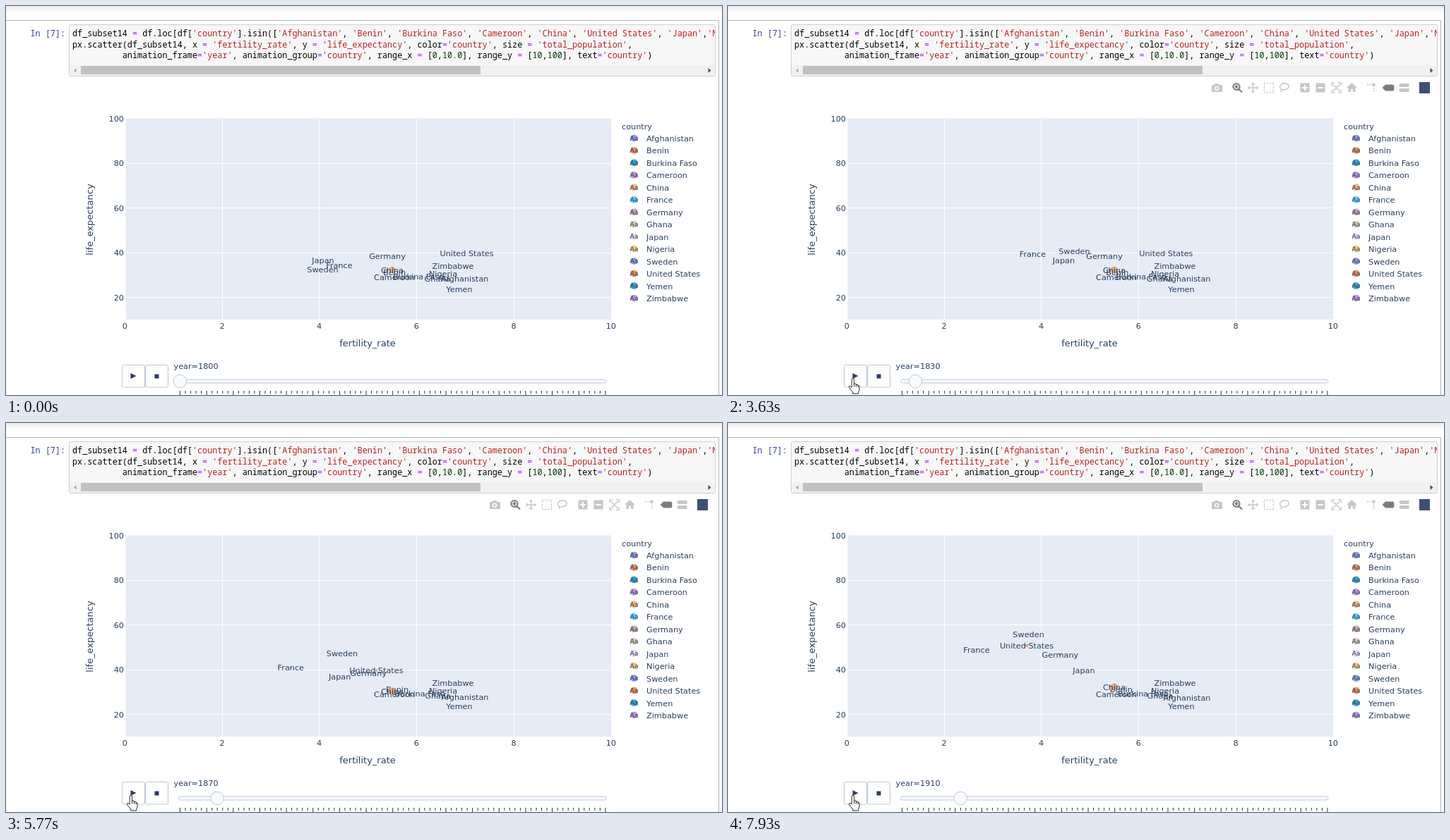
Animation, 1014 px wide and 552 px high, one loop 8000 ms. Source, as an HTML page:

```html
<!DOCTYPE html>
<html lang="en">
<head>
<meta charset="utf-8">
<title>Fertility and life expectancy</title>
<style>
  html, body { margin: 0; width: 100%; height: 100%; overflow: hidden; background: #fff; }
  svg { display: block; width: 1014px; height: 552px; }
  text { font: 11.25px "DejaVu Sans", Verdana, sans-serif; fill: #2a3f5f; white-space: pre; }
  .title { font-size: 13px; }
  .mono { font: 11.8px "Noto Sans Mono", "DejaVu Sans Mono", monospace; fill: #000; }
  .prompt { fill: #303f9f; }
  .str { fill: #ba2121; }
  .op { fill: #a2f; }
  .num { fill: #063806; }
  .key { font-size: 9.2px; }
  .control { fill: #fff; stroke: #bec8d9; }
  .rail { fill: #f8fafc; stroke: #bec8d9; }
  .icon { fill: none; stroke: #c7c7c7; stroke-width: 1.5; }
  .icon.solid { fill: #c7c7c7; stroke: none; }
  .icon.on { stroke: #7c7c7c; stroke-width: 2; }
  .icon.solid.on { fill: #7c7c7c; }
</style>
</head>
<body>
<svg id="stage" viewBox="0 0 1014 552">
  <defs>
    <linearGradient id="shade" x2="0" y2="1">
      <stop stop-color="#ebebeb"/><stop offset="1" stop-color="#fff"/>
    </linearGradient>
    <clipPath id="codeBox"><rect x="90" y="28" width="914" height="56"/></clipPath>
  </defs>
  <rect width="1014" height="10" fill="url(#shade)"/>
  <path d="M0 20.5H1009.5V552" fill="none" stroke="#b4b4b4"/>
  <text class="mono prompt" x="34.5" y="43">In [7]:</text>
  <rect x="89.5" y="26.5" width="915" height="73" rx="2" fill="#f7f7f7" stroke="#cfcfcf"/>
  <g id="code" clip-path="url(#codeBox)"></g>
  <rect x="90" y="84" width="914" height="15" fill="#f1f1f1"/>
  <rect x="106" y="85" width="566" height="12" fill="#c1c1c1"/>
  <path d="M99.5 88.5V94.5L96 91.5z" fill="#a3a3a3"/>
  <path d="M994.5 88V95L998.5 91.5z" fill="#505050"/>

  <g id="modebar">
    <path class="icon solid" fill-rule="evenodd" d="M685 112h3.5l1.2-2h4.6l1.2 2h4.5v10h-15zM692 113.5a3.3 3.3 0 1 0 .01 0zM692 115a1.8 1.8 0 1 1-.01 0z"/>
    <path class="icon on" d="M720 109.9a4.6 4.6 0 1 0 .01 0zM723.5 118l4.5 4.5M717.5 114.5h5M720 112v5"/>
    <path class="icon" d="M737 116h13M743.5 109.5v13M739 114l-2 2 2 2M748 114l2 2-2 2M741.5 111.5l2-2 2 2M741.5 120.5l2 2 2-2"/>
    <rect class="icon" x="759.5" y="109.5" width="13" height="13" stroke-dasharray="2 1.7"/>
    <path class="icon" d="M783 118c-4-5 2-9 7-8s6 6 1 8-8 0-8 0 2 2 0 4"/>
    <path class="icon solid" fill-rule="evenodd" d="M810.5 109.5h13v13h-13zM816 112v3h-3v2h3v3h2v-3h3v-2h-3v-3z"/>
    <path class="icon solid" fill-rule="evenodd" d="M832.5 109.5h13v13h-13zM835 115v2h8v-2z"/>
    <path class="icon" d="M855 113v-4h4M864 109h4v4M868 119v4h-4M859 123h-4v-4M857 111.5l9 9M866 111.5l-9 9"/>
    <path class="icon solid" d="M883.5 109l7 6.5-1 1-1-.8v6.3h-3.5v-4h-3v4h-3.5v-6.3l-1 .8-1-1z"/>
    <path class="icon" stroke-dasharray="2 1.5" d="M905 111.5h9.5v11"/>
    <path class="icon solid" d="M912.5 109.5h4v4h-4z"/>
    <path class="icon solid on" d="M928 116l3.5-3.5h9.5q1.300 0 1.300 1.300v4.400q0 1.300-1.300 1.300h-9.500z"/>
    <path class="icon solid" d="M950 112.5l2-2.5h12.5v5H952zM950 119.500l2-2.500h12.500v5H952z"/>
    <rect x="979" y="108" width="15" height="16" fill="#3f4f75"/>
  </g>

  <rect x="168.5" y="159.5" width="688.5" height="285.5" fill="#e5ecf6"/>
  <g id="axes"></g>
  <text class="title" x="512" y="482.5" text-anchor="middle">fertility_rate</text>
  <text class="title" transform="translate(122.5 303) rotate(-90)" text-anchor="middle">life_expectancy</text>
  <g id="points"></g>
  <text x="872" y="174.5">country</text>
  <g id="legend"></g>

  <rect class="control" x="164.5" y="509.5" width="32" height="31.5" rx="2"/>
  <rect class="control" x="197.5" y="509.5" width="32" height="31.5" rx="2"/>
  <path d="M176.5 521L184.5 525 176.5 529zM210.5 522.5h6v6h-6z" fill="#2a3f5f"/>
  <text id="year" x="237.5" y="515"></text>
  <rect class="rail" x="244.5" y="530" width="605.5" height="5" rx="2.5"/>
  <g id="ticks"></g>
  <circle id="knob" class="rail" cy="532.5" r="9.3"/>

  <circle id="press" cx="176" cy="528" r="10.5" fill="#e0403a" opacity=".25"/>
  <path id="arrow" d="M0 0V15L3.5 12 6 17.5 8.3 16.5 6 11.2H10.5z" fill="#fff" stroke="#000"/>
  <path id="hand" transform="translate(170 528)" fill="#fff" stroke="#222" stroke-linejoin="round"
    d="M5.2 13V2.2a1.7 1.7 0 0 1 3.4 0V8q2.5-.8 2.8 1 2.3-.6 2.6 1.2 2-.3 2 1.7V16q0 2-1.3 3.5V22H6.8V20Q3.5 16.5 1.5 13.5 1 11.2 3 11.5zM8.6 8v4M11.4 9v3.5M14 10.2v2.8"/>
</svg>
<script>
const LOOP = 8000, START = 2550, FRAME = 500, TICK = 76.86;
const $ = id => document.getElementById(id);
const clamp = v => Math.min(1, Math.max(0, v));
const lerp = (a, b, p) => a + (b - a) * p;
const crisp = v => Math.floor(v) + 0.5;

function add(parent, tag, attrs, text) {
  const node = document.createElementNS("http://www.w3.org/2000/svg", tag);
  for (const name in attrs) node.setAttribute(name, attrs[name]);
  if (text !== undefined) node.textContent = text;
  return parent.appendChild(node);
}

// Code cell
const code = [
  "df_subset14 = df.loc[df['country'].isin(['Afghanistan', 'Benin', 'Burkina Faso', 'Cameroon', 'China', 'United States', 'Japan','N",
  "px.scatter(df_subset14, x = 'fertility_rate', y = 'life_expectancy', color='country', size = 'total_population',",
  "          animation_frame='year', animation_group='country', range_x = [0,10.0], range_y = [10,100], text='country')"
];
code.forEach((line, i) => {
  const row = add($("code"), "text", { class: "mono", x: 94, y: 43 + i * 15.7 });
  for (const part of line.split(/('[^']*'?|=|\b\d[\d.]*)/)) {
    const kind = part[0] === "'" ? "str" : part === "=" ? "op" : /^\d/.test(part) ? "num" : "";
    add(row, "tspan", { class: kind }, part);
  }
});

// Axes
for (let i = 0; i <= 5; i++) {
  const x = 168.3 + i * 137.7;
  if (i < 5) add($("axes"), "path", { d: `M${crisp(x)} 159.5V445`, stroke: "#fff", "stroke-width": i ? 1 : 2 });
  add($("axes"), "text", { x, y: 457.5, "text-anchor": "middle" }, i * 2);
}
for (let v = 20; v <= 100; v += 20) {
  const y = 477 - v * 3.175;
  if (v < 100) add($("axes"), "path", { d: `M168 ${crisp(y)}H857`, stroke: "#fff" });
  add($("axes"), "text", { x: 167, y: y + 4, "text-anchor": "end" }, v);
}
for (let i = 0; i <= 80; i++)
  add($("ticks"), "rect", { x: 246 + i * 7.53, y: 546, width: 1, height: i % 5 ? 4 : 7, fill: "#333" });

// Pixel tracks, one entry per decade; a short track holds its first value until its end part.
const DECADES = 12;
const track = list => [...Array(Math.max(0, DECADES - list.length)).fill(list[0]), ...list];
const ramp = (a, b) => Array.from({ length: DECADES }, (_, i) => lerp(a, b, i / (DECADES - 1)));
// name, colour, x, y, radius
const countries = [
  ["Afghanistan", "#8f9cdf", [650], ramp(386.5, 390), [0.6]],
  ["Benin", "#e8935f", ramp(550, 557), [377.5], [0.6]],
  ["Burkina Faso", "#3aa5cb", ramp(584, 588), [384], [0.6]],
  ["Cameroon", "#bf98da", [550], [385], [0.6]],
  ["China", "#f3b679", [547], [375, 381 + 4.5, 375, 375, 375, 375, 375], ramp(5, 5.8)],
  ["France", "#68c9f0", [472, 455, 433, 423, 413.5, 409, 404, 402.5, 398, 388, 366, 347.5],
    [368, 360, 352, 349, 348, 341, 340, 356, 344, 334, 328, 319.5], [1.4]],
  ["Germany", "#c8a6ae", [540, 540, 535, 522, 504.5, 505, 510, 517, 521, 513, 489, 464.5],
    [354.5, 344.5, 337, 326], ramp(1.2, 1.9)],
  ["Ghana", "#d6cfb4", ramp(611, 612), [387], [0.6]],
  ["Japan", "#ecd5ee", [449, 463, 475, 478, 481.5, 481, 480, 464, 415, 438, 486, 509.5],
    [361, 359.5, 358.5, 357, 353, 350.5], [1.5]],
  ["Nigeria", "#f4cd82", [619], [380], [1]],
  ["Sweden", "#8f9cdf", [448.5, 462, 493, 476, 476, 476, 476, 476, 470, 457, 440, 421],
    [374, 368, 348.2, 347, 337, 334, 323.5, 331.5, 326, 317, 311, 296.5], [0.6]],
  ["United States", "#e8935f", [652.5, 639, 622, 611, 594, 565, 534, 513, 496, 477, 434, 419.5],
    [351, 341, 321, 314.4], ramp(0.6, 2.4)],
  ["Yemen", "#3aa5cb", [642], [402], [0.6]],
  ["Zimbabwe", "#bf98da", [633], [369], [0.6]]
].map(([name, fill, x, y, r], i) => {
  const row = 188 + i * 17.46;
  add($("legend"), "ellipse", { cx: 889.5, cy: row - 0.5, rx: 5.4, ry: 4.8, fill });
  add($("legend"), "text", { class: "key", x: 889.5, y: row + 2.8, "text-anchor": "middle" }, "Aa");
  add($("legend"), "text", { x: 907, y: row + 4 }, name);
  const point = add($("points"), "g");
  const dot = add(point, "circle", { fill: name === "China" ? "#e3a06f" : fill, opacity: 0.85 });
  add(point, "text", { y: 4, "text-anchor": "middle" }, name);
  return { point, dot, x: track(x), y: track(y), r: track(r) };
});

const easeInOut = p => p < 0.5 ? 4 * p ** 3 : 1 - 4 * (1 - p) ** 3;
const show = (id, on) => $(id).setAttribute("visibility", on ? "visible" : "hidden");

function draw(t) {
  const run = t < START ? -1 : Math.floor((t - START + 13) / TICK) * TICK;
  const from = run < 0 ? 0 : Math.min(DECADES - 2, Math.floor(run / FRAME));
  const p = run < 0 ? 0 : clamp(run / FRAME - from);
  for (const c of countries) {
    const at = list => lerp(list[from], list[from + 1], p);
    c.point.setAttribute("transform", `translate(${at(c.x)} ${at(c.y)})`);
    c.dot.setAttribute("r", at(c.r));
  }
  const step = run < 0 ? 0 : from + 1;
  $("year").textContent = "year=" + (1800 + step * 10);
  const slide = run < 0 ? 0 : from + easeInOut(clamp(p * FRAME / 150));
  $("knob").setAttribute("cx", 246.4 + slide * 7.53);

  $("modebar").setAttribute("opacity", clamp((t - 610) / 300));
  const left = (1 - clamp((t - 610) / 800)) ** 2;
  $("arrow").setAttribute("transform", `translate(${lerp(176, 520, left)} ${lerp(528, 552, left)})`);
  show("arrow", t >= 610 && t < 1400);
  show("hand", t >= 1400);
  show("press", t >= 1830 && t < 2150);
}

const origin = performance.now();
function loop() {
  draw((performance.now() - origin) % LOOP);
  requestAnimationFrame(loop);
}
loop();
</script>
</body>
</html>
```
